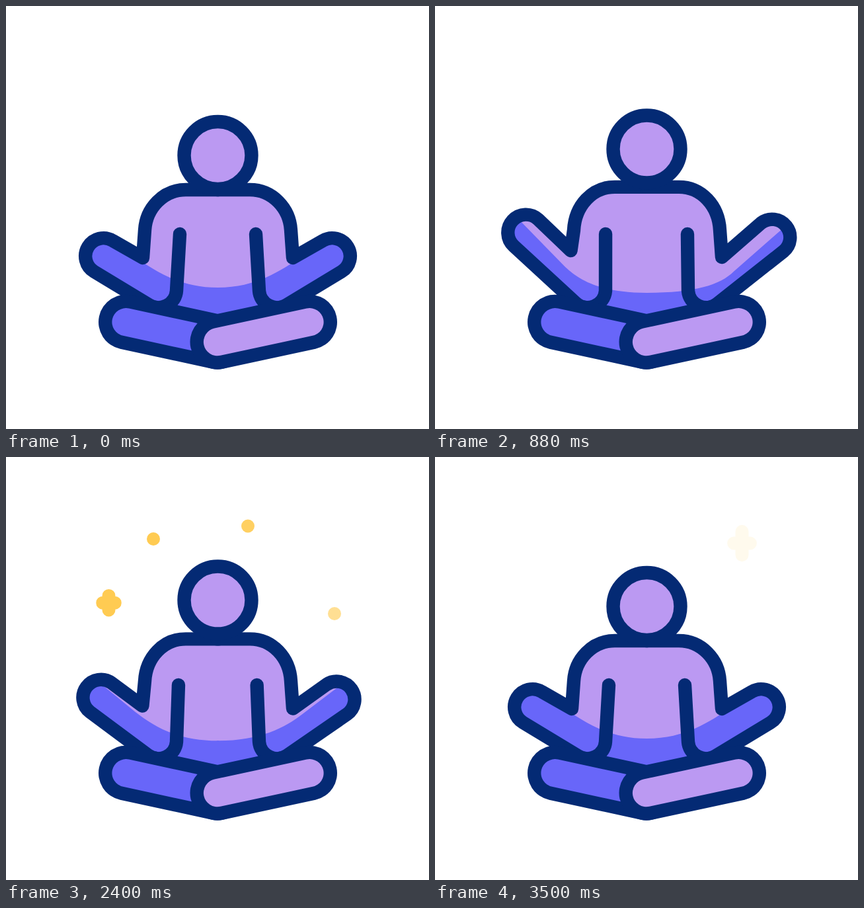
An HTML page for the animation above (3.6 s loop, 640 px wide and 640 px high).

```html
<!DOCTYPE html>
<html lang="en">
<head>
<meta charset="utf-8">
<title>Breathing meditation</title>
<style>
  html, body { margin: 0; width: 100%; height: 100%; overflow: hidden; background: #fff; }
  svg { display: block; width: 100vw; height: 100vh; }
  .line { fill: none; stroke: #042a74; stroke-width: 20.4; stroke-linecap: round; stroke-linejoin: round; }
  .light { fill: #bb99f2; }
  .deep { fill: #6866f9; }
  .dot { fill: #ffcb52; }
  .plus { fill: none; stroke: #ffcb52; stroke-width: 20; stroke-linecap: round; }
</style>
</head>
<body>
<svg viewBox="0 0 640 640">
  <defs>
    <clipPath id="body"><path id="clipL"/><path id="clipR"/></clipPath>
  </defs>
  <g id="sparks"></g>
  <g clip-path="url(#body)">
    <rect class="light" width="640" height="640"/>
    <path class="deep" id="shadeL"/>
    <path class="deep" id="shadeR"/>
  </g>
  <path class="line" id="lineL"/>
  <path class="line" id="lineR"/>
  <g id="legs"></g>
  <circle class="line light" id="head" cx="320.5" r="51" style="fill:#bb99f2"/>
</svg>
<script>
const LOOP = 3600, STEP = 20, AXIS = 641, ARM_R = 27.3;
const $ = id => document.getElementById(id);

const add = (parent, tag, attrs) => {
  const el = document.createElementNS('http://www.w3.org/2000/svg', tag);
  for (const k in attrs) el.setAttribute(k, attrs[k]);
  return parent.appendChild(el);
};

// Piecewise linear value from [time, value] keys.
const track = (keys, t) => {
  if (t <= keys[0][0]) return keys[0][1];
  for (let i = 1; i < keys.length; i++) {
    const [t0, a] = keys[i - 1], [t1, b] = keys[i];
    if (t <= t1) return a + (b - a) * (t - t0) / (t1 - t0);
  }
  return keys[keys.length - 1][1];
};

const headLift = [[0, 0], [1380, 1], [2000, 1], [3080, 0]];
const chestLift = [[0, 0], [1380, 1], [2000, 1], [2675, 0]];
const armLift = [[0, 0], [890, 1], [2000, 1], [2675, 0]];

// Both sides are given in left-hand coordinates: [resting, lifted].
const sides = {
  L: {
    hand: [[147.5, 378.5], [137.5, 342.5]],
    pit: [[207, 381], [205.5, 370]],
    crease: [[263, 345], [258, 345]],
    tip: [[140, 345], [125, 321]],
    bend: [[195, 380], [195, 393]]
  },
  R: {
    hand: [[147.5, 378.5], [130.5, 349.5]],
    pit: [[207, 381], [207, 380]],
    crease: [[263, 345], [259, 345]],
    tip: [[140, 345], [106, 329]],
    bend: [[195, 380], [189, 402]]
  }
};

function drawSide(name, arm, chest) {
  const flip = name === 'R';
  const pt = (x, y) => `${(flip ? AXIS - x : x).toFixed(2)},${y.toFixed(2)} `;
  const pose = key => {
    const [a, b] = sides[name][key];
    return a.map((v, i) => v + (b[i] - v) * arm);
  };
  const arc = (x, y) => `A${ARM_R},${ARM_R} 0 0 ${flip ? 1 : 0} ${pt(x, y)}`;

  const [hx, hy] = pose('hand'), [px, py] = pose('pit');
  const [cx, cy] = pose('crease'), [tx, ty] = pose('tip'), [bx, by] = pose('bend');
  const ex = 231, ey = 429, top = 278 - 6.5 * chest;
  const len = Math.hypot(ex - hx, ey - hy);
  const nx = -(ey - hy) / len * ARM_R, ny = (ex - hx) / len * ARM_R;

  const edge = `M${pt(322, top)}L${pt(272, top)}` +
    `C${pt(238, top)}${pt(212, top + 28)}${pt(210, 339)}` +
    `L${pt(px, py)}L${pt(hx - nx, hy - ny)}${arc(hx + nx, hy + ny)}` +
    `L${pt(ex + nx, ey + ny)}${arc(ex + 27, ey + 2)}`;
  $('line' + name).setAttribute('d', edge + `L${pt(cx, cy)}`);
  $('clip' + name).setAttribute('d', edge + `L${pt(258, 470)}L${pt(322, 485)}Z`);

  const mid = 426 + 8 * arm;
  $('shade' + name).setAttribute('d',
    `M${pt(tx, ty)}L${pt(bx, by)}` +
    `C${pt(bx + 30 - 10 * arm, by + 20)}${pt(262 - 15 * arm, mid)}${pt(320.5, mid)}` +
    `L${pt(322, mid)}L${pt(322, 500)}L${pt(60, 500)}L${pt(60, ty)}Z`);
}

function addLeg(x, color) {
  const leg = `M${x},478.2L320,508.2`;
  for (const [stroke, width] of [['#042a74', 83], [color, 42.2]])
    add($('legs'), 'path', { d: leg, stroke, 'stroke-width': width, 'stroke-linecap': 'round' });
}
addLeg(181.5, '#6866f9');
addLeg(459.5, '#bb99f2');

const dots = [[497, 245, 2060], [223, 130, 2150], [366, 100.5, 2200]].map(([x, y, start], i) => ({
  el: add($('sparks'), 'circle', { class: 'dot', r: 10, cx: x }),
  y: i < 2 ? y - 8 : y, start
}));
const dotFade = [[0, 0], [220, 1], [280, 1], [440, 0]];
const dotRise = [[0, 12], [300, 0]];

const pluses = [[155.5, 197, 3040, 3060], [464.5, 130.5, 3500, LOOP]].map(([x, y, end, off]) => ({
  el: add($('sparks'), 'path', { class: 'plus' }), x, y, end, off
}));
// Times are relative to the end of the rise.
const plusFade = [[-820, 0], [-700, 1], [-220, 1], [0, 0.1]];
const plusWide = [[-820, 0], [-460, 18.5], [-420, 20], [-360, 21.5], [0, 12.4]];
const plusTall = [[-820, 0], [-460, 21.5], [-420, 23], [-360, 25], [0, 17.8]];

function render(t) {
  const arm = track(armLift, t), chest = track(chestLift, t);
  drawSide('L', arm, chest);
  drawSide('R', arm, chest);
  $('head').setAttribute('cy', 226 - 15 * track(headLift, t));

  for (const d of dots) {
    d.el.setAttribute('cy', d.y + track(dotRise, t - d.start));
    d.el.setAttribute('opacity', track(dotFade, t - d.start));
  }
  for (const p of pluses) {
    const u = Math.min(t - p.end, 0);
    const w = track(plusWide, u), h = track(plusTall, u), y = p.y - 0.037 * u;
    p.el.setAttribute('d', `M${p.x - w},${y}h${2 * w}M${p.x},${y - h}v${2 * h}`);
    p.el.setAttribute('opacity', t < p.off ? track(plusFade, u) : 0);
  }
}

const begin = performance.now();
function tick() {
  const t = (performance.now() - begin) % LOOP;
  render(Math.floor(t / STEP) * STEP);
  requestAnimationFrame(tick);
}
tick();
</script>
</body>
</html>
```
